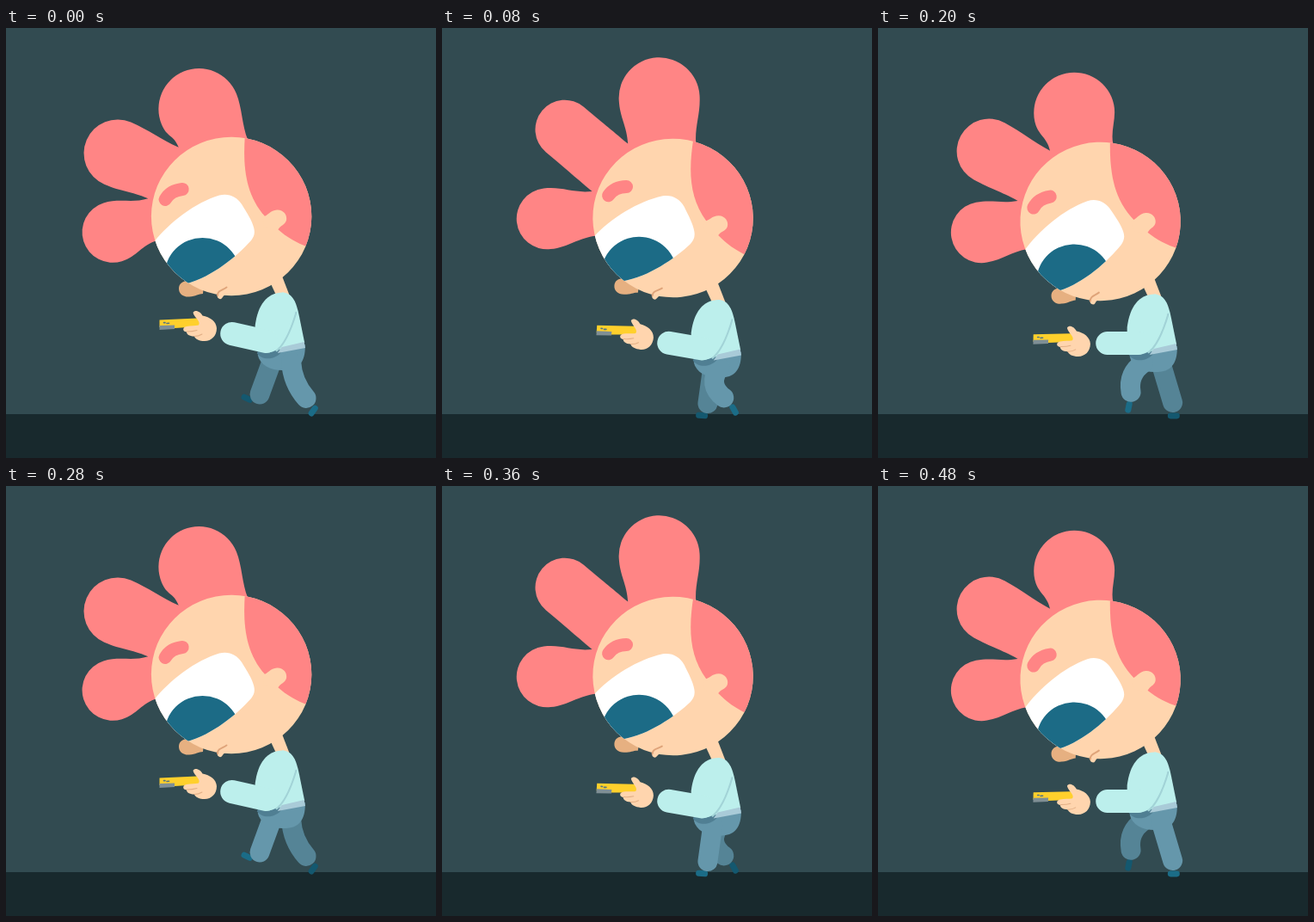
Recreate the animation shown at these times as an HTML page. Size 500x500 px, loop 0.56 s.

```html
<!DOCTYPE html>
<html lang="en">
<head>
<meta charset="utf-8">
<title>Walking with a phone</title>
<style>
  html, body { margin: 0; width: 100%; height: 100%; overflow: hidden; background: #324b51; }
  svg { display: block; width: 100%; height: 100%; }
  .skin { fill: #ffd5ae; }
  .hair { fill: #ff8585; }
  .shirt { fill: #bcefec; }
  .near { --cloth: #6597ab; --shoe: #1b6c87; }
  .far { --cloth: #558496; --shoe: #14586f; }
  .leg { fill: none; stroke: var(--cloth); stroke-width: 23; stroke-linecap: round; }
  .shoe { fill: var(--shoe); }
  .line { fill: none; stroke-linecap: round; stroke-linejoin: round; }
</style>
</head>
<body>
<svg viewBox="0 0 500 500">
  <defs>
    <clipPath id="skull"><ellipse cx="262" cy="219" rx="93.2" ry="92.2"/></clipPath>
    <clipPath id="lids">
      <path id="eye" d="M172 249C190 226 220 203 248 194.5C259 192 268 196 274 205C280 215 286 224 288 232C290 239 288 243 285 247C268 266 240 289 211 297L150 312Z"/>
    </clipPath>
  </defs>

  <rect width="500" height="500" fill="#324b51"/>
  <rect y="449" width="500" height="51" fill="#18292d"/>

  <g id="neck"><path class="skin" d="M302 284L318 280L330 311L315 312Z"/></g>
  <path id="hair" class="hair"/>

  <g id="head">
    <path fill="#e6b081" d="M229 309C224 309 221 312 213 312.5C206 313 201 309 201 303C201 297 206 294 212 294L230 298Z"/>
    <ellipse class="skin" cx="262" cy="219" rx="93.2" ry="92.2"/>
    <g clip-path="url(#skull)">
      <path class="hair" d="M278 120C275 158 277 192 301 219L316 234C326 243 338 250 352 255L380 200L340 110Z"/>
      <use href="#eye" fill="#fff"/>
      <circle cx="228.5" cy="288.2" r="44.2" fill="#1c6b86" clip-path="url(#lids)"/>
    </g>
    <path class="skin" d="M298 220C305 218 307 212 315 211.5C322 211 327 217 326 223C325 228 321 229 318 232L315 236L300 232Z"/>
    <path class="line" stroke="#ff8585" stroke-width="15" d="M185 199.5Q191 189 205 187.5"/>
    <path class="line" stroke="#ffd5ae" stroke-width="6" d="M249 312Q252 307 257 306"/>
    <path class="line" stroke="#dfa47a" stroke-width="2" d="M246 311C246 305 252 305 256.5 301.5"/>
  </g>

  <g id="farLeg" class="far">
    <rect class="shoe" x="-7" y="-3.5" width="14" height="7" rx="3.3"/><path class="leg"/>
  </g>
  <g id="hips">
    <path fill="#6597ab" d="M293 380L348 368C349 384 343 396 330 397.5C312 400 296 394 293 380Z"/>
  </g>
  <g id="nearLeg" class="near">
    <rect class="shoe" x="-7" y="-3.5" width="14" height="7" rx="3.3"/><path class="leg"/>
  </g>

  <g id="body">
    <path fill="#507f93" d="M292 378C298 387 314 387 323 374L321 366H300Z"/>
    <path class="shirt" d="M322 307.500C334 308 338 320 341 334L347.500 366L318 374L300 330Z"/>
    <path fill="#a9cbd8" d="M347 365L348.300 372L316 378L321 371Z"/>
    <path class="line" stroke="#a2d3d7" stroke-width="2.5" d="M337.500 331C333 346 326 366 315 375"/>
    <path class="shirt" d="M323 307.500C304 307 293 322 290 346L290 372C298 379 310 379 316 373C325 364 332 347 336.500 331L336 318Z"/>
    <path id="sleeve" class="line" stroke="#bcefec" stroke-width="27"/>
  </g>

  <g id="hand">
    <path fill="#ffd02c" d="M178.500 339.500L222 337.500Q227 338 226 347L196 349L178.500 348Z"/>
    <path fill="#7f8f95" d="M178.500 346L196 345.500V350L178.500 351Z"/>
    <path class="line" stroke="#527583" stroke-width="1.6" d="M183.500 342.700H185M187 343.500L189.500 343.300"/>
    <path class="skin" d="M217.500 331C220 327 226 330 228.500 334.500C237 336 244.500 341 245 349C245 358 239 364 231 364C225 364 220 362 219 358.500C213 358.500 210 356 210 353.500C205 353 205 348 210 347C215 346 220 346.500 224 345.500C227 341 219 337 217.500 331Z"/>
    <path class="line" stroke="#e3b087" stroke-width="1" d="M210.500 353Q217 353 222 351.500M219 358.500Q224 358.500 228 356"/>
  </g>
</svg>

<script>
const $ = id => document.getElementById(id);
const { sin, cos, max, hypot, atan2, PI } = Math;
const STEP = 40, LOOP = 560, LAST = 480, RAD = PI / 180;

// angles count from straight up, towards the face
const tufts = [
  { angle: 5.3, sway: 1, reach: 133, stretch: 1, size: 47, squash: 0 },
  { angle: 49.5, sway: 1, reach: 159.5, stretch: 0.5, size: 33.7, squash: 0.6 },
  { angle: 89.5, sway: 0.7, reach: 141, stretch: 0.7, size: 35.5, squash: 0 }
];

// periodic motion: a mean, one swing, and a touch of double speed
const wave = (a, mean, c, s, c2 = 0) => mean + c * cos(a) + s * sin(a) + c2 * cos(2 * a);

const move = (p, dir, by) => [p[0] + dir[0] * by, p[1] + dir[1] * by];
const middle = (p, q) => [(p[0] + q[0]) / 2, (p[1] + q[1]) / 2];

// unit vector from p to q, with the distance
function aim(p, q) {
  const x = q[0] - p[0], y = q[1] - p[1], far = hypot(x, y);
  return { dir: [x / far, y / far], far };
}

// a round-ended lobe standing on two root points
function lobe(root, nextRoot, tip, size) {
  const { dir, far } = aim(middle(root, nextRoot), tip);
  const side = [-dir[1], dir[0]], pull = far * 0.4;
  const a = move(tip, side, size), b = move(tip, side, -size);
  return `M${root}C${move(root, dir, pull)} ${move(a, dir, -pull)} ${a}` +
    `A${size} ${size} 0 0 0 ${b}` +
    `C${move(b, dir, -pull)} ${move(nextRoot, dir, pull)} ${nextRoot}`;
}

function drawHair(a, centre, tilt) {
  const flop = wave(a, 5.5, 6.8, -3.6, -0.8);
  const stretch = wave(a, 0, 0, 5.5, -2.5);
  const polar = (deg, r) => move(centre, [-sin(deg * RAD), -cos(deg * RAD)], r);
  const roots = [
    polar(-12 - tilt, 91),
    polar(30.5 + 0.6 * flop, 101),
    polar(71 + 0.6 * flop, 99),
    polar(108 - tilt, 91)
  ];
  const d = tufts.map((t, i) => {
    const tip = polar(t.angle + t.sway * flop, t.reach + t.stretch * stretch - t.squash * flop);
    return lobe(roots[i], roots[i + 1], tip, t.size + 0.8 * t.squash * flop) + `L${centre}Z`;
  });
  $("hair").setAttribute("d", d.join(""));
}

function drawLeg(id, a, bob) {
  const lift = max(0, cos(a - 72 * RAD)) ** 0.7;
  const toeUp = max(0, -cos(a)) ** 4;
  const ankle = [wave(a, 319, 27, -9.5, 3), wave(a, 428.2, 2.2, -6) + 0.6 * bob];
  const hip = [319 + 0.42 * (ankle[0] - 319), 388 + 0.8 * bob];
  const { dir } = aim(hip, ankle);
  const knee = move(middle(hip, ankle), [-dir[1], dir[0]], 18 * lift);

  const shin = aim(knee, ankle).dir;
  const drop = atan2(shin[1], shin[0]) + (12 + 40 * toeUp) * RAD;
  const foot = move(ankle, [cos(drop), sin(drop)], 15.5 + 3 * lift);
  const turn = 180 - 125 * lift + 25 * toeUp;

  const [shoe, leg] = $(id).children;
  leg.setAttribute("d", `M${hip}Q${knee} ${ankle}`);
  shoe.setAttribute("transform", `translate(${foot}) rotate(${turn})`);
}

function place(id, x, y, spin = "") {
  $(id).setAttribute("transform", `translate(${x} ${y}) ${spin}`);
}

function draw(time) {
  const stride = time / LOOP * 2 * PI, a = 2 * stride;

  const headX = wave(a, 1.3, -1.2, 5.1), headY = wave(a, 2.8, -2, -2.05, -0.8);
  const tilt = 0.77 * headX;
  place("head", headX, headY, `rotate(${tilt} 262 219)`);
  drawHair(a, [262 + headX, 219 + headY], tilt);

  const bob = wave(a, 3.7, -2.65, 3.3, -1.05);
  for (const id of ["neck", "hips", "body"]) place(id, -0.3, bob);

  const sag = wave(a, 5.1, -6, -3.4, 0.9);
  $("sleeve").setAttribute("d", `M${263 + 0.45 * sag} ${355.5 + sag}L303 364.5`);

  const handY = wave(a, 10.9, -9.9, -4.1, -1);
  place("hand", 0.11 * handY, handY, `rotate(${wave(a, 2.95, -4.2, 1.3, 1.3)} 232 347)`);

  drawLeg("nearLeg", stride, bob);
  drawLeg("farLeg", stride + PI, bob);
}

const start = performance.now();
let shown = -1;
function tick() {
  const t = (performance.now() - start) % LOOP;
  const step = Math.min(Math.floor(t / STEP) * STEP, LAST);
  if (step !== shown) draw(shown = step);
  requestAnimationFrame(tick);
}
tick();
</script>
</body>
</html>
```
